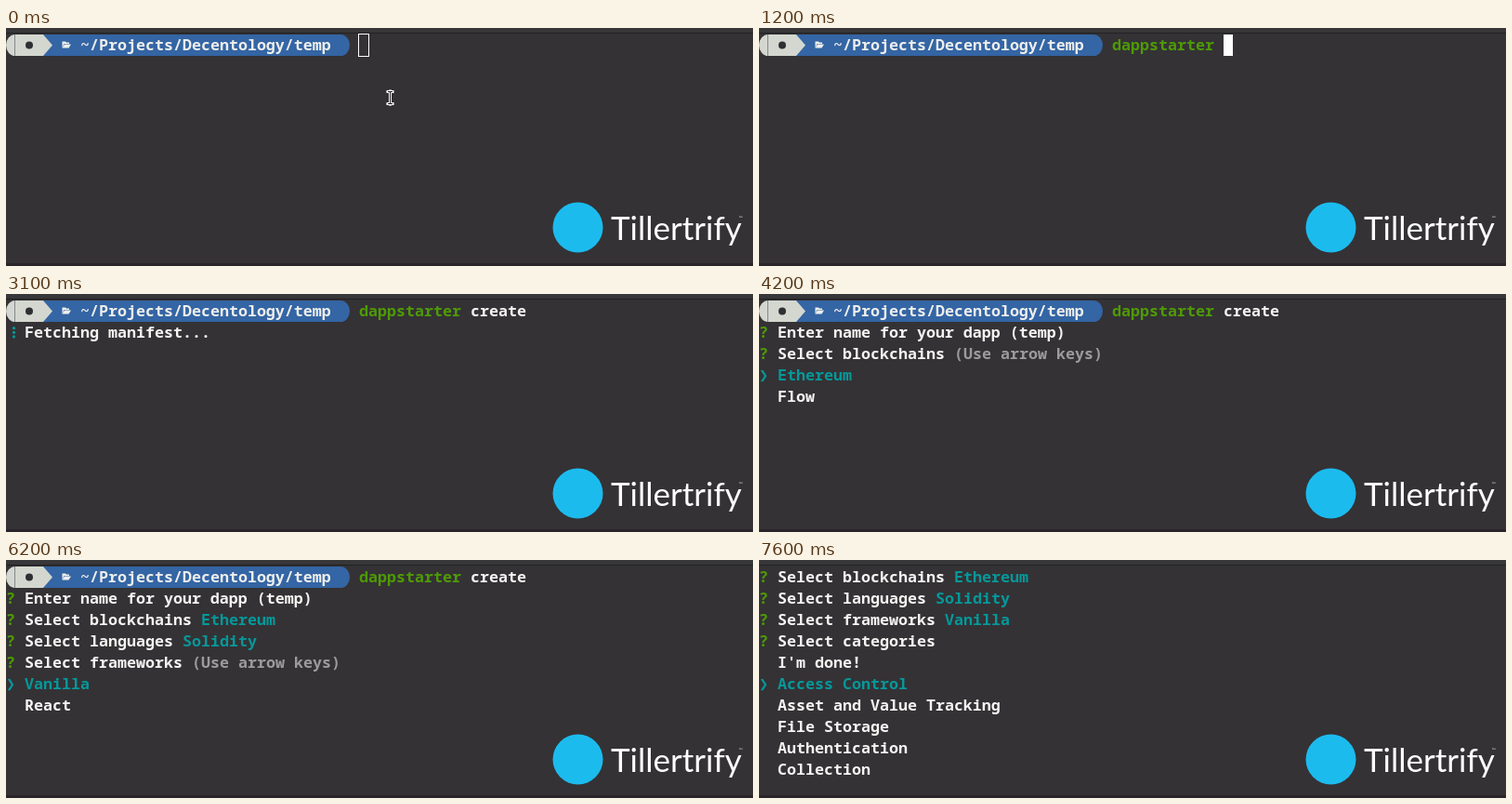
Write an HTML page that moves like this. It is 804 px wide and 256 px high and loops after 8 s.

```html
<!DOCTYPE html>
<html lang="en">
<head>
<meta charset="utf-8">
<title>Terminal session</title>
<style>
  html, body { margin: 0; width: 100%; height: 100%; overflow: hidden; background: #343235; }
  svg { display: block; }
  text { white-space: pre; }
  #screen, #prompt { font: 600 16.667px "Noto Sans Mono", "DejaVu Sans Mono", monospace; }
  #brand { font-family: Lato, sans-serif; fill: #fff; }
</style>
</head>
<body>
<svg width="804" height="256" viewBox="0 0 804 256">
  <rect width="804" height="5" fill="#373639"/>
  <rect y="5" width="804" height="1" fill="#222123"/>
  <rect y="253" width="804" height="3" fill="#292429"/>
  <g id="prompt">
    <path d="M40 7H360A10 11.5 0 0 1 360 30H40Z" fill="#3465a4"/>
    <path d="M10 7H40L50 18.5L40 30H10A10 11.5 0 0 1 10 7Z" fill="#d3d7cf"/>
    <rect x="9" y="7" width="1" height="23" fill="#85878a"/>
    <circle cx="25" cy="18.5" r="4" fill="#2e3033"/>
    <path d="M60.5 21.5V14.5H64L65 15.5H68V17H62.5L60.5 21.5H67.5L70 17.5H63Z" fill="#eeeeec"/>
    <text x="80" y="24" fill="#eeeeec">~/Projects/Decentology/temp</text>
  </g>
  <g id="screen"></g>
  <g id="pointer" fill="none">
    <path d="M411 68.5H416M411 81.5H416M413.5 68V82" stroke="#fff" stroke-width="3" stroke-linecap="square"/>
    <path d="M411 68.5H416M411 81.5H416M413.5 68V82" stroke="#222" stroke-width="1"/>
  </g>
  <g id="brand">
    <circle cx="615.5" cy="214.5" r="27" fill="#1cbbee"/>
    <text x="651" y="228" font-size="35">Tillertrify</text>
    <text x="789" y="206" font-size="5">™</text>
  </g>
</svg>
<script>
const WHITE = '#f4f4f2', GREEN = '#4e9a06', CYAN = '#06989a', GREY = '#9c9b9c', RED = '#cc0000';
const CELL = 10, LINE = 23, LOOP = 8000;
const $ = id => document.getElementById(id);

const text = (col, row, fill, s) =>
  `<text x="${col * CELL}" y="${24 + row * LINE}" fill="${fill}">${s}</text>`;

const cursor = (col, row) =>
  `<rect x="${col * CELL}" y="${7 + row * LINE}" width="10" height="23" fill="#fff"/>`;

const command = (name, arg = '', color = GREEN) =>
  text(38, 0, color, name) + text(39 + name.length, 0, WHITE, arg);

const typing = (name, arg, color) =>
  command(name, arg, color) + cursor(38 + name.length + (arg === undefined ? 0 : 1 + arg.length), 0);

const question = (row, s, answer = '', color = CYAN) =>
  text(0, row, GREEN, '?') + text(2, row, WHITE, s) + text(3 + s.length, row, color, answer);

const asking = (row, s) => question(row, s, '(Use arrow keys)', GREY);

const menu = (row, items, active = 0) => items.map((s, i) =>
  i === active ? text(0, row + i, CYAN, '❯') + text(2, row + i, CYAN, s)
               : text(2, row + i, WHITE, s)).join('');

// Braille cell: bits 0-2 are the left column, bits 3-5 the right one
function spinner(ch) {
  const bits = ch.charCodeAt(0) - 0x2800;
  let dots = '';
  for (let i = 0; i < 6; i++)
    if (bits >> i & 1)
      dots += `<circle cx="${i < 3 ? 3.5 : 8.5}" cy="${36.7 + i % 3 * 4.6}" r="1.6" fill="${CYAN}"/>`;
  return dots;
}

const full = command('dappstarter', 'create');
const fetching = ch => full + spinner(ch) + text(2, 1, WHITE, 'Fetching manifest...');
const named = full + question(1, 'Enter name for your dapp (temp)');
const chain = row => question(row, 'Select blockchains', 'Ethereum');
const language = row => question(row, 'Select languages', 'Solidity');
const categories = ["I'm done!", 'Access Control', 'Asset and Value Tracking',
  'File Storage', 'Authentication', 'Collection'];
const answered = chain(0) + language(1) + question(2, 'Select frameworks', 'Vanilla');

const steps = [
  [0, '<rect x="379.5" y="6.5" width="11" height="24" fill="none" stroke="#fff"/>'],
  [100, cursor(38, 0)],
  [400, typing('d', undefined, RED)],
  [500, typing('da', undefined, RED)],
  [800, typing('dap', undefined, RED)],
  [900, typing('dapp', undefined, RED)],
  [1200, typing('dappstarter', '')],
  [1900, typing('dappstarter', 'c')],
  [2000, typing('dappstarter', 'cre')],
  [2100, typing('dappstarter', 'crea')],
  [2200, typing('dappstarter', 'create')],
  [2700, full + cursor(0, 1)],
  [2800, fetching('⠋')],
  [2900, fetching('⠙')],
  [3000, fetching('⠹')],
  [3100, fetching('⠸')],
  [3200, named + cursor(35, 1)],
  [3900, named],
  [4100, named + cursor(35, 1)],
  [4200, named + asking(2, 'Select blockchains') + menu(3, ['Ethereum', 'Flow'])],
  [5200, named + chain(2) + asking(3, 'Select languages') + menu(4, ['Solidity'])],
  [6200, named + chain(2) + language(3) + asking(4, 'Select frameworks') + menu(5, ['Vanilla', 'React'])],
  [7000, answered + asking(3, 'Select categories') + menu(4, categories)],
  [7600, answered + question(3, 'Select categories') + menu(4, categories, 1)]
];

let shown = -1;
const start = performance.now();

function draw() {
  const t = Math.max(0, performance.now() - start) % LOOP;
  const now = steps.findLastIndex(([at]) => at <= t);
  if (now !== shown) {
    shown = now;
    $('screen').innerHTML = steps[now][1];
    $('prompt').style.display = t < 7000 ? '' : 'none';
    $('pointer').style.display = t < 400 ? '' : 'none';
  }
  requestAnimationFrame(draw);
}
draw();
</script>
</body>
</html>
```
